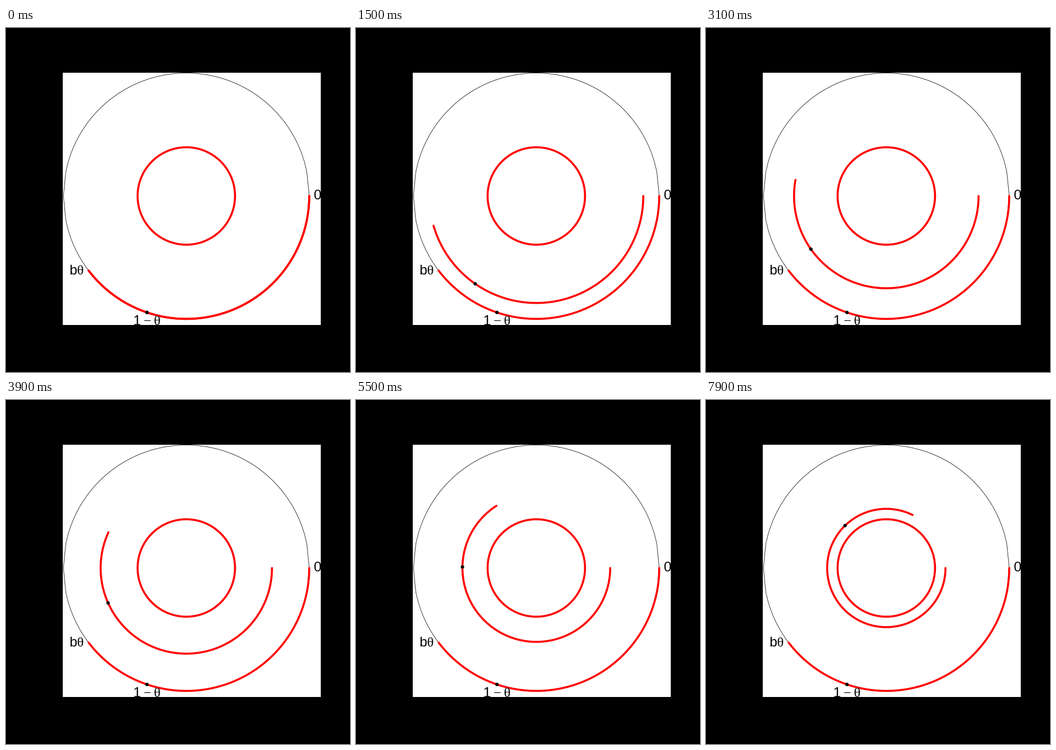
Write a matplotlib script that moves like this. It is 600 by 600 pixels and loops after 8 s.

```python
import numpy as np
import matplotlib.pyplot as plt
from matplotlib.animation import FuncAnimation
from matplotlib.patches import Circle, Rectangle

DPI = 100
PX = 72 / DPI              # points per pixel
FRAMES, STEP = 80, 100     # 100 ms per frame
CX, CY, R = 314.5, 293, 214.4
RATIO = 0.3963             # inner radius / outer radius
DOT = 0.7617               # position of the dot along the arc
SHRINK_FRAMES = 100        # frames needed to close the arc completely

fig = plt.figure(figsize=(6, 6), dpi=DPI, facecolor="black")
ax = fig.add_axes([0, 0, 1, 1])
ax.set(xlim=(0, 600), ylim=(600, 0))
ax.axis("off")
ax.add_patch(Rectangle((99, 78), 450, 440, fc="white", lw=0))


def point(r, a):
    return CX + r * np.cos(a), CY + r * np.sin(a)


def arc(r):
    """Arc of constant length, clockwise from angle 0."""
    return point(r, np.linspace(0, 2 * np.pi * RATIO * R / r, 300))


def dot_pos(r):
    return point(r, DOT * 2 * np.pi * RATIO * R / r)


def red_line(xs, ys, z):
    return ax.plot(xs, ys, color="red", lw=3.5 * PX, zorder=z,
                   solid_capstyle="round", solid_joinstyle="round")[0]


def add_dot(pos, z):
    return ax.add_patch(Circle(pos, 3, fc="black", lw=0, zorder=z))


def label(x, y, s, font="Liberation Sans"):
    ax.text(x, y, s, family=font, size=24 * PX, color="black",
            ha="left", va="baseline", zorder=8)


# Thin circle sampled evenly in x, so it is coarse at both sides
u = np.linspace(-1, 1, 101)
v = np.sqrt(np.clip(1 - u**2, 0, 1))
for sign in (-1, 1):
    ax.plot(CX + R * u, CY + sign * R * v, color="black", lw=0.75 * PX,
            zorder=2, snap=False)

red_line(*arc(R), 3)
red_line(*arc(R * RATIO), 3)
add_dot(dot_pos(R), 6)

SERIF = "Liberation Serif"
label(536, 299, "0")
label(110, 430, "b")
label(123.5, 430, "θ", SERIF)
label(221.5, 518, "1")
label(239.5, 518, "−", SERIF)
label(258, 518, "θ", SERIF)

moving = red_line([], [], 4)
dot = add_dot(dot_pos(R), 7)


def update(n):
    r = R * RATIO ** (n / SHRINK_FRAMES)
    moving.set_data(*arc(r))
    dot.center = dot_pos(r)
    return moving, dot


anim = FuncAnimation(fig, update, frames=FRAMES, interval=STEP,
                     repeat=True, repeat_delay=0)
plt.show()
```
